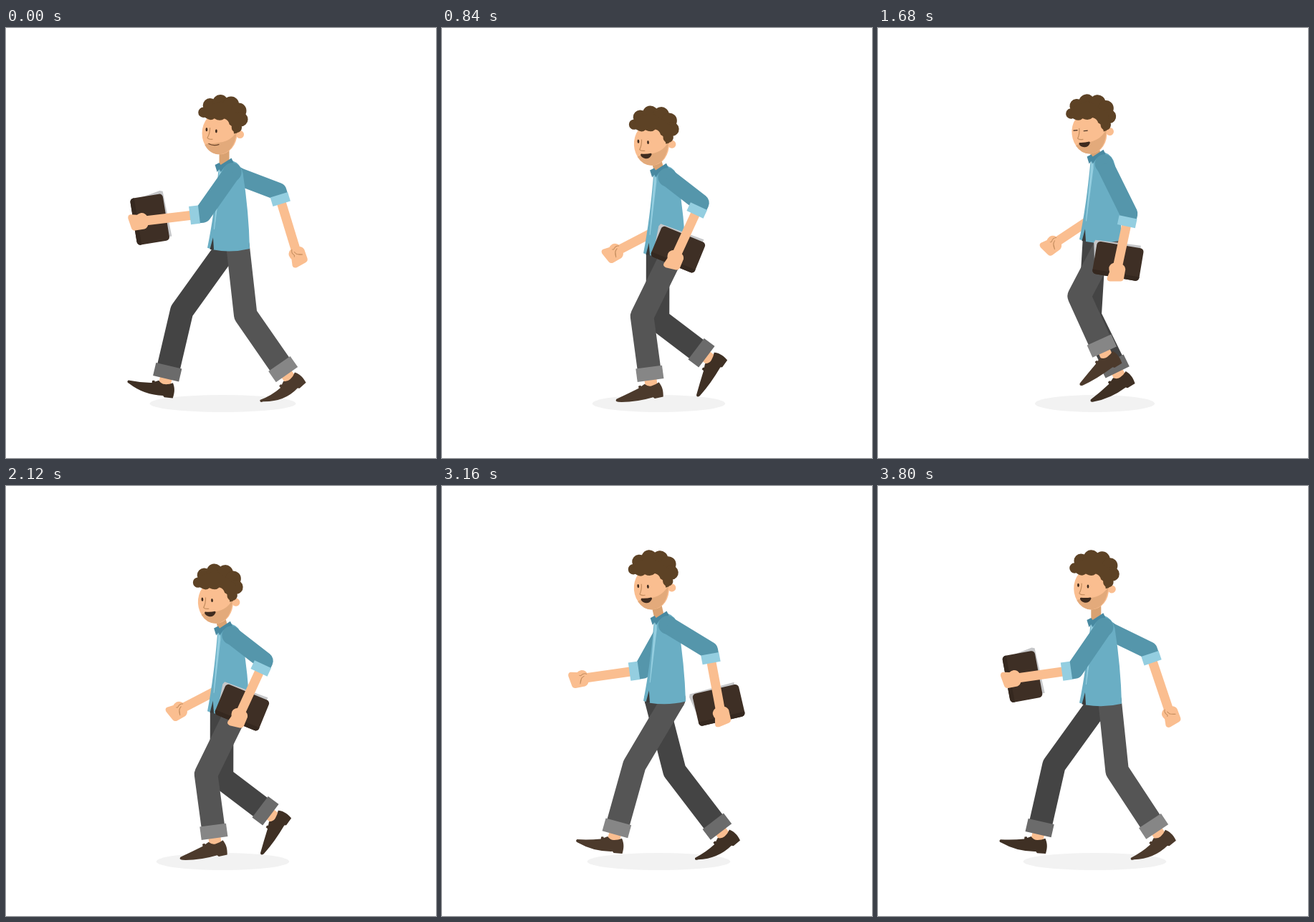
These frames come from a looping animation (600 by 600 pixels, 3840 ms). An HTML page with a canvas:

```html
<!DOCTYPE html>
<html lang="en">
<head>
<meta charset="utf-8">
<title>Walk cycle</title>
<style>
  html, body { margin: 0; width: 100%; height: 100%; overflow: hidden; background: #fff; }
  canvas { display: block; }
</style>
</head>
<body>
<canvas id="stage" width="600" height="600"></canvas>
<script>
const ctx = document.getElementById('stage').getContext('2d');
const STEP = 40, CYCLE = 32, GROUND = 521.5;

const C = {
  skin: '#fabe90', shade: '#e3aa7b', neck: '#d9a272', line: '#c48d5e',
  hair: '#5d4225', ink: '#3f2b1e', shirt: '#6aaec4', sleeve: '#5596ab',
  collar: '#4889a1', light: '#94cee0', book: '#3e2f25', spine: '#35281f',
  page: '#c6c7c9', shadow: '#f2f2f2'
};
const FAR = { pants: '#444', cuff: '#6b6b6b', shoe: '#3f3024' };
const NEAR = { pants: '#555', cuff: '#868686', shoe: '#4c3a2c' };

const rad = d => d * Math.PI / 180;
const along = (x, y, a, d) => [x + Math.cos(a) * d, y + Math.sin(a) * d];

// Mean plus harmonics, each given as an amplitude and the phase of its peak.
function wave(q, mean, ...parts) {
  let v = mean;
  for (let i = 0; i < parts.length; i += 2) {
    const n = i / 2 + 1;
    v += parts[i] * Math.cos(2 * Math.PI * n * (q - parts[i + 1]) / CYCLE);
  }
  return v;
}

// Both legs share one gait, half a cycle apart; 0 is the heel strike.
function legPose(q, near) {
  return {
    hip: near ? 323.5 : wave(q, 304.5, 6, 0),
    knee: [
      wave(q, 281.5, 40, 15.8, 3.8, 0) + (near ? wave(q, 16, 7, 0) : 0),
      wave(q, 396, 10, 12, 10, 3.6, 4.5, 10)
    ],
    ankle: [
      wave(q, 316, 80, 16.6, 9.5, 6.8, 7, 4) + (near ? wave(q, 9, 9, 0) : 0),
      wave(q, 476, 17, 6.8, 11, .8, 4, 7.5)
    ],
    turn: wave(q, -24.5, 26, 2, 9.5, -.7)
  };
}

// Both arms share one swing; 0 is the hand furthest forward.
function armPose(q, near) {
  return {
    elbow: [wave(q, near ? 329 : 334, 50, 15.9, 5.5, 6.5), wave(q, 253, 18, 2.6, 10, 7)],
    hand: [
      wave(q, 282, 103, 15.4, 6, 14) + (near ? 0 : wave(q, 12, 7, 16)),
      wave(q, 312, 27, 14, 17, 7.8)
    ]
  };
}

function fill(d, color) {
  ctx.fillStyle = color;
  ctx.fill(new Path2D(d));
}
function stroke(d, color, width) {
  ctx.strokeStyle = color;
  ctx.lineWidth = width;
  ctx.stroke(new Path2D(d));
}
function oval(x, y, rx, ry, color) {
  ctx.fillStyle = color;
  ctx.beginPath();
  ctx.ellipse(x, y, rx, ry, 0, 0, 7);
  ctx.fill();
}
function box(x, y, w, h, r, color) {
  ctx.fillStyle = color;
  ctx.beginPath();
  ctx.roundRect(x, y, w, h, r);
  ctx.fill();
}
function line(points, color, width) {
  stroke('M' + points.map(p => p.join()).join('L'), color, width);
}
function group(draw) {
  ctx.save();
  draw();
  ctx.restore();
}

// The toe lifts before the heel lands and stays on the ground at push-off.
function toeBend(y, turn) {
  const a = rad(turn);
  const toe = y - 50 * Math.sin(a) + 20 * Math.cos(a);
  return turn > 0 ? -1.3 * turn : Math.min(0, (GROUND - toe) / Math.cos(a));
}

function shoe(color, b) {
  const toe = 18 + b;
  fill(`M11,-1C14,4 16,10 14,20L2,20.5L0,18.5Q-26,22 -49,${toe + 2.5}
    Q-54,${toe + 1} -51,${toe - 2}Q-34,${9 + b * .3} -18,3L-18,0L-15,-.5L-14,1L-9,-1.5Q-5,3 0,2.5Q6,2 11,-1Z`, color);
}

function leg({ hip, knee, ankle, turn }, drop, look) {
  const top = [hip, 303 + drop];
  const a = Math.atan2(ankle[1] - knee[1], ankle[0] - knee[0]);
  const foot = along(...ankle, a, 5.5);
  line([along(...ankle, a, -3), along(...foot, a, 4)], C.skin, 17);
  group(() => {
    ctx.translate(...foot);
    ctx.rotate(rad(turn));
    shoe(look.shoe, toeBend(foot[1], turn));
  });
  oval(...top, 16.3, 16.3, look.pants);
  line([top, knee, along(...ankle, a, -4)], look.pants, 32.6);
  line([along(...ankle, a, -18.5), ankle], look.cuff, 37);
}

function book() {
  ctx.translate(-17, -1);
  ctx.rotate(rad(2.5));
  fill('M8,-32L-20,-37.5L-24,-36L-26.5,28L-18,28Z', C.page);
  box(-23, -33, 46, 66, 5, C.book);
  box(17, -33, 6, 66, [0, 5, 5, 0], C.spine);
}

function arm(shoulder, { elbow, hand }, holding) {
  const a = Math.atan2(hand[1] - elbow[1], hand[0] - elbow[0]);
  const atHand = draw => group(() => {
    ctx.translate(...hand);
    ctx.rotate(a);
    ctx.scale(1, -1);
    draw();
  });
  if (holding) atHand(book);
  line([along(...elbow, a, 8), along(...hand, a, -8)], C.skin, 13);
  atHand(() => {
    fill('M-14,-5Q-12,-11 -6,-11.5Q-2,-11 0,-9.5L9,-11Q13,-11 13,-6L10,8Q9,12 5,12L-8,11.5Q-13,10 -14,5Z', C.skin);
    if (!holding) stroke('M-13,-5Q-9,-8 -4,-4L-2,-5M-9,-3Q-3,-1 -2,7L-5,-1', C.line, 1);
  });
  oval(...shoulder, 13, 13, C.sleeve);
  line([shoulder, elbow, along(...elbow, a, 6)], C.sleeve, 24.5);
  line([along(...elbow, a, 5), along(...elbow, a, 18)], C.light, 25.5);
}

function torso() {
  fill('M298,193L316,184Q328,188 331,202Q339,255 340,307Q315,313 290,308.5L281,305.5Q291,258 297,196Z', C.shirt);
  fill('M289,291L290,308.5L284.5,307.5Z', '#3a3a3a');
  fill('M298,196L301,192L301,206L291,280L290,280Z', C.light);
  fill('M292,190L298,187L300,190L315,180.5L318,187L305,193L300,200L298,196L295,200Z', C.collar);
}

function hair() {
  for (let i = 0; i < 7; i++) {
    const a = rad(200 + 33 * i);
    const r = 7.2 + 3.9 * Math.sqrt(Math.abs(Math.sin(Math.PI * i / 6)));
    oval(300 + 27 * Math.cos(a), 127 + 21.5 * Math.sin(a), r, r, C.hair);
  }
  fill('M272,122Q283,134 290,128Q298,133 304,128Q310,130 311,136Q317,139 317.5,149L322,148L327,125L300,104L280,110Z', C.hair);
}

function head(p) {
  oval(326, 150, 5.5, 5.5, C.skin);
  oval(297.5, 148.5, 24.5, 29.5, C.skin);
  fill('M321.5,146Q313,160 297,161.5L287,163Q280,162 277,165Q284,178 297.5,178Q318,176 321.5,146Z', C.shade);
  hair();
  stroke('M284,141Q284,149 280.5,155Q282,157.5 288,157', C.line, 1.2);
  if (p >= 9 && p <= 11) {
    stroke('M275.5,143.5h6M289.5,145.5h6', C.ink, 1.2);
  } else {
    oval(279.3, 143.5, 1.4, 2.6, C.ink);
    oval(292.8, 145.5, 1.4, 2.6, C.ink);
  }
  if (p < 7) stroke('M282,163Q289,167 297,164', '#6b452a', 1.3);
  else fill('M282.5,161Q290,162 296,161Q298,162 296,164.5Q293,169 288,168Q283,167 281.5,163Q281.5,161 282.5,161Z', C.ink);
}

function draw(p) {
  const back = p + CYCLE / 2;
  const drop = wave(p, -1.2, 1.5, 30, 11, 3.8);
  const lean = wave(p, -1, 1, 5);
  const hx = wave(p, -2.4, 3.2, 2), hy = wave(p, 2.3, 0, 0, 11.5, 4.9);
  const tilt = wave(p, -3, 2.5, 2, 3, 3);
  const farArm = armPose(back, false);

  ctx.clearRect(0, 0, 600, 600);
  ctx.lineJoin = 'round';
  oval(302.5, 524, wave(p, 92.8, 0, 0, 10, 1), 12, C.shadow);
  arm([312 + (farArm.elbow[0] - 283) * .1, 205 + drop], farArm, false);
  leg(legPose(p, false), drop, FAR);
  leg(legPose(back, true), drop, NEAR);
  line([[304 + hx, 170 + hy], [305 + lean, 191 + drop]], C.neck, 14);
  group(() => {
    ctx.translate(310, 305 + drop);
    ctx.rotate(lean / 120);
    ctx.translate(-310, -305);
    torso();
  });
  group(() => {
    ctx.translate(297 + hx, 150 + hy);
    ctx.rotate(rad(tilt));
    ctx.translate(-297, -150);
    head(p);
  });
  arm([316 + lean * .8, 200 + drop], armPose(p, true), true);
}

const start = performance.now();
function tick() {
  draw(Math.floor((performance.now() - start) / STEP) % CYCLE);
  requestAnimationFrame(tick);
}
tick();
</script>
</body>
</html>
```
